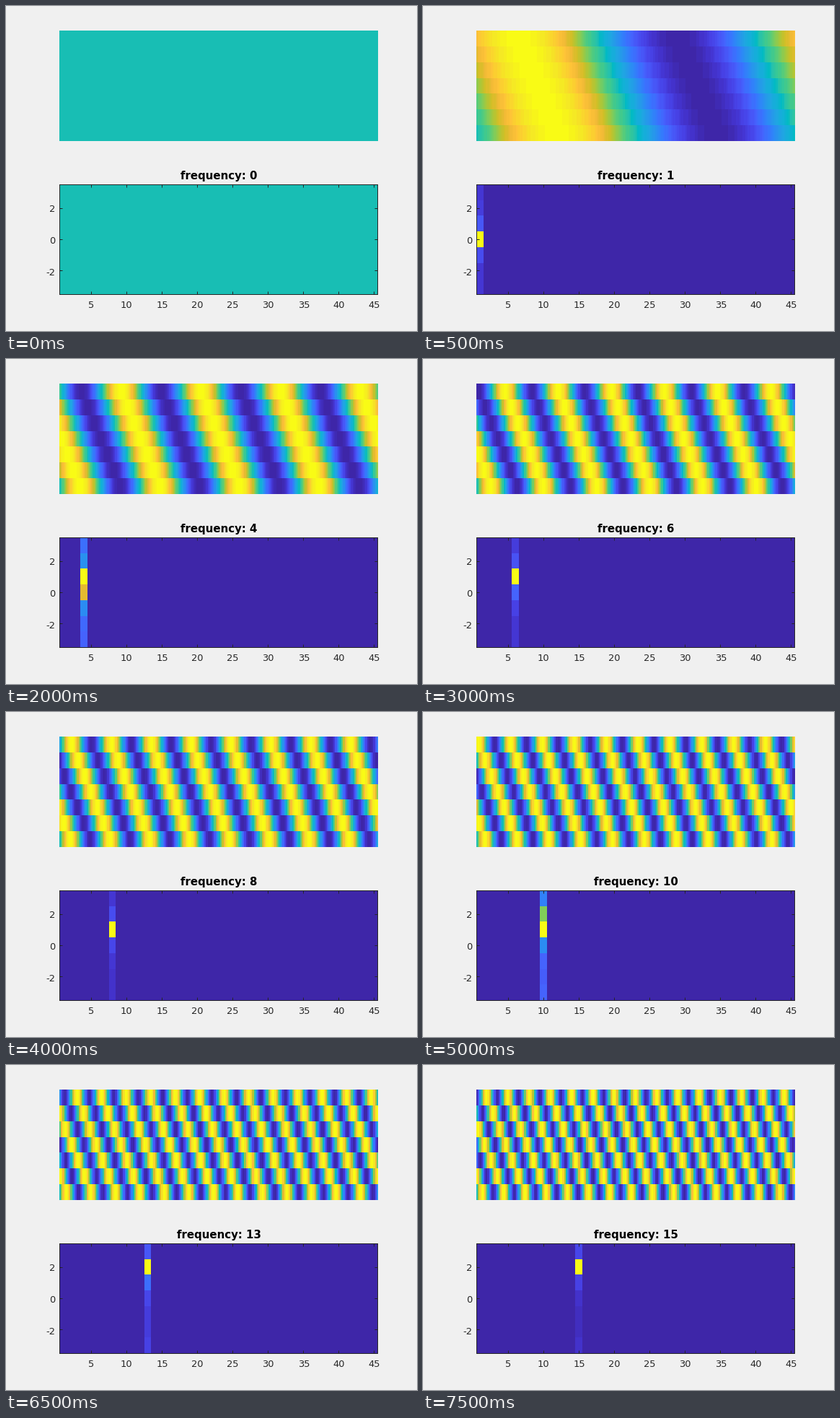
Write a matplotlib script that moves like this. It is 570 px wide and 450 px high and loops after 8000 ms.

```python
import numpy as np
import matplotlib.pyplot as plt
from matplotlib.animation import FuncAnimation
from matplotlib.colors import LinearSegmentedColormap

W, H, DPI = 570, 450, 100
PX = 72 / DPI                     # one pixel in points
ROWS, SAMPLES, BINS = 7, 200, 45
DELAY = 0.02                      # delay between neighbouring rows
FRAMES, STEP = 16, 500
INK = "#262626"

PARULA = ("3e26a8 4332cb 4741e5 4852f4 4563fd 3875fe 2e87f7 2797eb "
          "20a5e3 12b1d6 02bac3 24c1ae 37c897 57cc7a 81cc59 abc739 "
          "d1bf27 f0ba36 fec338 fad62d f5e924 f9fb15").split()
cmap = LinearSegmentedColormap.from_list(
    "parula", ["#" + c for c in PARULA], N=64)

plt.rcParams["font.family"] = "DejaVu Sans"
fig = plt.figure(figsize=(W / DPI, H / DPI), dpi=DPI, facecolor="#f0f0f0")


def axes_at(x0, y0, x1, y1):
    return fig.add_axes([x0 / W, 1 - y1 / H, (x1 - x0) / W, (y1 - y0) / H])


def label(x, y, text, size, **kw):
    return fig.text(x / W, 1 - y / H, text, fontsize=size * PX,
                    va="baseline", **kw)


def image(ax, shape, clim, **kw):
    return ax.imshow(np.zeros(shape), cmap=cmap, vmin=clim[0], vmax=clim[1],
                     aspect="auto", interpolation="nearest", **kw)


wave_ax = axes_at(74, 34, 516, 187)
wave_ax.axis("off")
wave = image(wave_ax, (ROWS, SAMPLES), (-1, 1))

# whole-pixel edges, so that the one-pixel frame lines stay sharp
spec_ax = axes_at(74, 247, 515, 399)
spec = image(spec_ax, (ROWS, BINS), (0, 1), origin="lower",
             extent=(0.5, BINS + 0.5, -ROWS / 2, ROWS / 2))
x_ticks, y_ticks = range(5, 46, 5), (-2, 0, 2)
spec_ax.set_xticks(x_ticks)
spec_ax.set_yticks(y_ticks)
spec_ax.tick_params(direction="in", top=True, right=True, length=4 * PX,
                    width=PX, color=INK, labelbottom=False, labelleft=False)
for spine in spec_ax.spines.values():
    spine.set(linewidth=PX, color=INK)

# labels follow the unrounded layout box
left, width = 0.13 * W, 0.775 * W
bottom, height = 0.89 * H, 0.3412 * H
for v in x_ticks:
    label(left + (v - 0.5) / BINS * width, 418, str(v), 13,
          ha="center", color=INK)
for v in y_ticks:
    label(68, bottom - (v / ROWS + 0.5) * height + 5, str(v), 13,
          ha="right", color=INK)
title = label(295, 240, "", 15, ha="center", color="black", weight="bold")

t = np.arange(SAMPLES) / SAMPLES
row = np.arange(ROWS)


def update(freq):
    lead = DELAY * (ROWS - 1 - row)[:, None]
    s = np.sin(2 * np.pi * freq * (t + lead))
    bins = np.zeros((ROWS, BINS))
    if freq:
        s /= np.abs(s).max()
        k = np.abs(np.fft.fft(np.exp(2j * np.pi * freq * DELAY * row)))
        bins[:, freq - 1] = np.fft.fftshift(k) / k.max()
    else:
        bins += 0.5
    wave.set_data(s)
    spec.set_data(bins)
    title.set_text(f"frequency: {freq}")
    return wave, spec, title


anim = FuncAnimation(fig, update, frames=FRAMES, interval=STEP,
                     repeat=True, repeat_delay=0)
plt.show()
```
